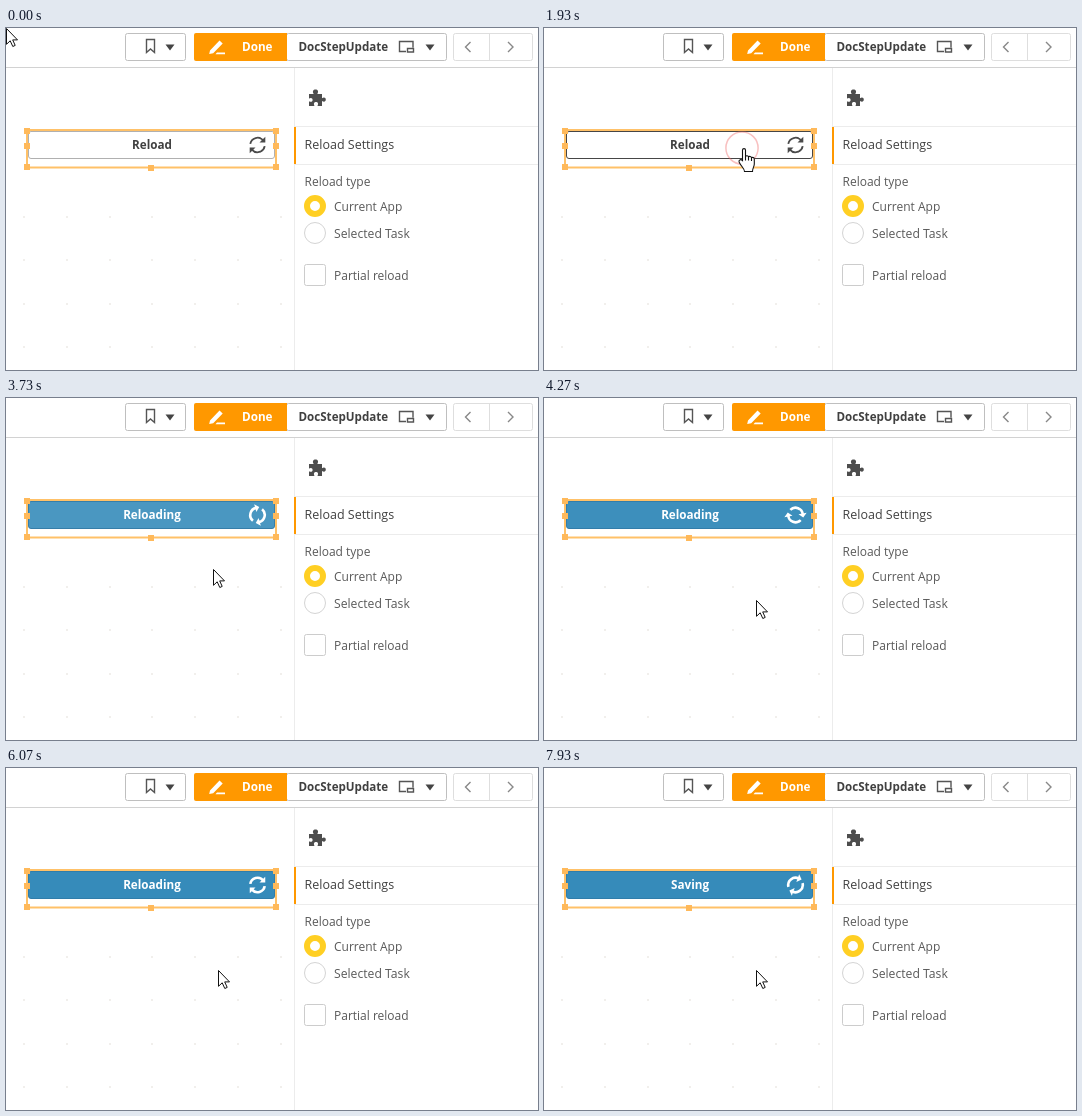
Recreate the animation shown at these times as an HTML page. Size 532 px wide and 342 px high, loop 8 s.

```html
<!DOCTYPE html>
<html lang="en">
<head>
<meta charset="utf-8">
<title>Reload button</title>
<style>
  html, body { margin: 0; width: 100%; height: 100%; overflow: hidden; background: #fff; }
  svg { display: block; width: 532px; height: 342px; }
  text { font: 12px "Open Sans", "Noto Sans", sans-serif; fill: #595959; }
  .bold { font-weight: 700; font-size: 11.7px; fill: #404040; }
  .mid { text-anchor: middle; }
  .box { fill: #fff; stroke: #bfbfbf; }
  .line { fill: none; stroke: #555; stroke-width: 1.4; }
  .rule { fill: none; stroke: #ececec; }
</style>
</head>
<body>
<svg viewBox="0 0 532 342">
  <defs>
    <g id="half">
      <path d="M-7.2-1.2A7.3 7.3 0 0 1 5.6-4.6" fill="none" stroke="currentColor"/>
      <path d="M7.8-8.2V-2.4H2Z" fill="currentColor"/>
    </g>
  </defs>
  <rect width="532" height="342" fill="#fff"/>
  <g id="grid" fill="#f1efec"></g>

  <path d="M0 39.5H532" stroke="#d2d2d2"/>
  <rect class="box" x="119.5" y="5.5" width="60" height="27" rx="2"/>
  <path class="line" d="M140.5 11.5h8v13l-4-3.6-4 3.6z"/>
  <path d="M159.500 16.500h9l-4.500 6z" fill="#444"/>
  <rect class="box" x="280.500" y="5.500" width="160" height="27" rx="2"/>
  <path d="M190 5h91v28h-91a2 2 0 0 1-2-2V7a2 2 0 0 1 2-2z" fill="#ff9800"/>
  <path d="M204 22.500l9.500-10 3.200 3-9.500 9.800-4 .7zM211 24.500h8v1.800h-9.500z" fill="#fff"/>
  <text class="bold" x="236" y="23" style="fill:#fff">Done</text>
  <text class="bold" x="292.500" y="23" style="font-size:11.600px">DocStepUpdate</text>
  <path class="line" d="M400 23.500h-6.500v-10h13.500v6M401.500 20.500h6v3.500h-6z"/>
  <path d="M419.500 16.500h9l-4.500 6z" fill="#444"/>
  <rect class="box" x="447.500" y="5.500" width="79" height="27" rx="2" style="stroke:#dedede"/>
  <path d="M483.500 5.500v27" stroke="#dedede"/>
  <path class="line" d="M464.500 14l-5 5 5 5M502 14l5 5-5 5" style="stroke:#888"/>

  <path class="rule" d="M288.500 40V342M289 98.500H532M289 136.500H532"/>
  <rect x="288" y="99" width="2" height="37" fill="#ff9800"/>
  <path d="M303 66h4.700c-1.600-2.400-.5-4.500 1.800-4.500s3.400 2.100 1.800 4.500h4.700v4.200c2-1.500 3.800-.7 3.800 1.400s-1.800 3-3.800 1.400V78h-4.500c1.300-2.400.2-3.900-1.500-3.900s-2.800 1.500-1.500 3.900H303v-4.800c2.200 1.300 3.600.3 3.600-1.300s-1.400-2.600-3.600-1.300z" fill="#4d4d4d"/>
  <text x="298.500" y="121" style="font-size:12.500px;fill:#404040">Reload Settings</text>
  <text x="298.500" y="158">Reload type</text>
  <circle cx="309" cy="178" r="8" fill="#fff" stroke="#ffcf23" stroke-width="6"/>
  <text x="328" y="183">Current App</text>
  <circle class="box" cx="309" cy="205" r="10.500" style="stroke:#d4d4d4"/>
  <text x="328" y="210" style="font-size:12.200px">Selected Task</text>
  <rect class="box" x="298.500" y="236.500" width="21" height="21" rx="2" style="stroke:#ccc"/>
  <text x="328" y="252">Partial reload</text>

  <rect id="button" x="22.500" y="103.500" width="246" height="27" rx="2.500"/>
  <text id="label" class="bold mid" x="146" y="121"></text>
  <g id="icon"><use href="#half"/><use href="#half" transform="rotate(180)"/></g>
  <rect x="21" y="102" width="249" height="37.500" fill="none" stroke="#ffc168" stroke-width="2"/>
  <g id="handles" fill="#ffb95a"></g>

  <circle id="ring" cx="198" cy="120" fill="none" stroke="#e66" stroke-width="1.500"/>
  <path id="arrow" d="M.5.5V16.300L4.200 12.800 6.800 18.500 9.200 17.400 6.700 11.900H11.500Z" fill="#fff" stroke="#111"/>
  <path id="hand" d="M-1.500 12.500V2C-1.500.1 1.500.1 1.500 2V8.500C2 7.300 4.300 7.500 4.500 9 5.200 8 7.200 8.300 7.500 9.700 8.600 8.900 10.300 9.600 10.300 11.200V16C10.300 18.500 8.500 20 8.500 23.500H.5C.5 20.500-2.500 19-4.800 14.200-5.800 12-3.300 10.800-1.500 12.500ZM1.500 8.500V12.500M4.500 9V12.500M7.500 9.700V13" fill="#fff" stroke="#111" stroke-width="1.100"/>
</svg>
<script>
const LOOP = 8000, FRAME = 1000 / 15, CLICK = 2000, SAVE = 6800;
const $ = id => document.getElementById(id);
const set = (id, attrs) => {
  for (const name in attrs) $(id).setAttribute(name, attrs[name]);
};

// Each row: time, then the values reached at that time.
const PATH = [
  [0, 0, 0], [60, 0, 0], [65, 294, 264], [270, 280, 240], [530, 225, 160],
  [800, 198, 111], [1200, 198, 111], [1530, 200, 120], [3400, 200, 120],
  [3730, 207, 171], [4000, 212, 202]
];
const BLUE = [[CLICK, 0], [2270, .5], [2930, .78], [3730, .9], [4530, 1]];
const HOVER = [[670, 0], [1000, 1]];
const RING = [[1730, 5, 0], [1800, 9, .6], [1930, 16, .42], [2130, 22, 0]];

function track(rows, t) {
  const next = rows.findIndex(row => row[0] > t);
  if (next === 0) return rows[0].slice(1);
  if (next < 0) return rows.at(-1).slice(1);
  const a = rows[next - 1], b = rows[next];
  const k = (t - a[0]) / (b[0] - a[0]);
  return a.slice(1).map((v, i) => v + (b[i + 1] - v) * k);
}
const mix = (a, b, k) => `rgb(${a.map((v, i) => Math.round(v + (b[i] - v) * k))})`;
const square = (x, y, size) => `<rect x="${x}" y="${y}" width="${size}" height="${size}"/>`;

let dots = "";
for (let y = 188; y < 342; y += 43.3)
  for (let x = 17; x < 280; x += 42.8) dots += square(Math.round(x), Math.round(y), 2);
$("grid").innerHTML = dots;
$("handles").innerHTML = [[18, 100], [267, 100], [18, 115], [267, 115], [18, 136], [267, 136], [142, 137]]
  .map(([x, y]) => square(x, y, 6)).join("");

function draw(time) {
  const t = Math.floor((time + 5) / FRAME) * FRAME;
  const busy = t >= CLICK;
  const [blue] = track(BLUE, t), [hover] = track(HOVER, t);
  set("button", {
    fill: mix([255, 255, 255], [54, 139, 186], blue),
    stroke: busy ? mix([110, 140, 160], [48, 125, 170], blue) : mix([176, 176, 176], [70, 70, 70], hover)
  });
  $("label").textContent = t >= SAVE ? "Saving" : busy ? "Reloading" : "Reload";
  $("label").style.fill = busy ? "#fff" : "#404040";
  const angle = busy ? (t - 2070) * .18 : 0;
  set("icon", {
    transform: `translate(251.5 117) rotate(${angle})`,
    color: busy ? "#fff" : "#4a4a4a",
    "stroke-width": busy ? 2.6 : 1.8
  });

  const [radius, opacity] = track(RING, t);
  set("ring", { r: radius, opacity });
  const [x, y] = track(PATH, t);
  const over = x > 22 && x < 269 && y > 103 && y < 131;
  const transform = `translate(${Math.round(x)} ${Math.round(y)})`;
  set("arrow", { transform, visibility: over ? "hidden" : "visible" });
  set("hand", { transform, visibility: over ? "visible" : "hidden" });
}

const start = performance.now();
function tick() {
  draw((performance.now() - start) % LOOP);
  requestAnimationFrame(tick);
}
tick();
</script>
</body>
</html>
```
